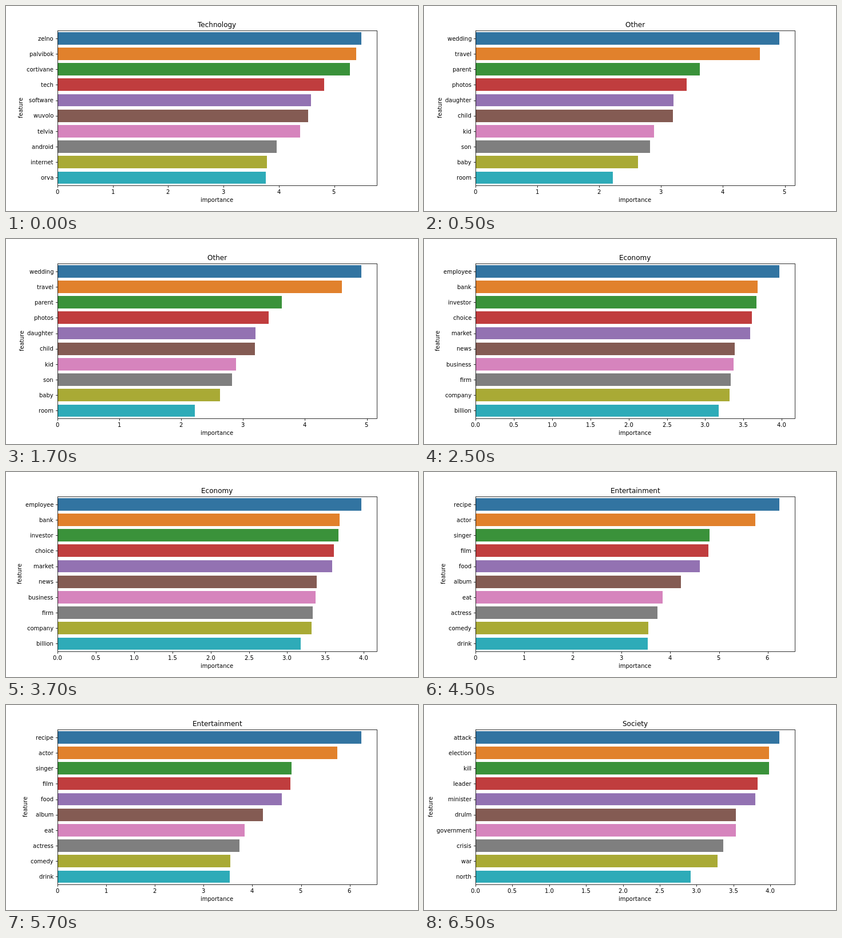
These frames come from a looping animation (720x360 px, 8 s). An HTML page with a canvas:

```html
<!DOCTYPE html>
<html lang="en">
<head>
<meta charset="utf-8">
<title>Feature importance</title>
<style>
html, body { margin: 0; width: 720px; height: 360px; overflow: hidden; background: #fff; }
canvas { display: block; }
</style>
</head>
<body>
<canvas width="720" height="360"></canvas>
<script>
const ctx = document.querySelector('canvas').getContext('2d');
const LEFT = 90, RIGHT = 648, TOP = 43.2, BOTTOM = 315;
const ROW = (BOTTOM - TOP) / 10;
const LOOP = 8000;
const COLORS = ['#3274a1', '#e1812c', '#3a923a', '#c03d3e', '#9372b2',
  '#845b53', '#d684bd', '#7f7f7f', '#a9aa35', '#2eabb8'];

// ends: right edge of each bar; unit: pixels per 1.0; labelX: baseline of the y-axis title
const charts = [
  { start: 0, title: 'Technology', unit: 96.7, step: 1, ticks: 6, labelX: 29,
    words: 'zelno palvibok cortivane tech software wuvolo telvia android internet orva',
    ends: [621, 612, 601, 556, 533, 528, 514, 473, 456, 454] },
  { start: 500, title: 'Other', unit: 108.1, step: 1, ticks: 6, labelX: 31,
    words: 'wedding travel parent photos daughter child kid son baby room',
    ends: [621, 587, 482, 459, 436, 435, 402, 395, 374, 330] },
  { start: 2500, title: 'Economy', unit: 133.8, step: 0.5, ticks: 9, labelX: 27,
    words: 'employee bank investor choice market news business firm company billion',
    ends: [621, 583, 581, 573, 570, 543, 541, 536, 534, 515] },
  { start: 4500, title: 'Entertainment', unit: 85.1, step: 1, ticks: 7, labelX: 37,
    words: 'recipe actor singer film food album eat actress comedy drink',
    ends: [621, 579, 499, 497, 482, 449, 417, 408, 392, 391] },
  { start: 6500, title: 'Society', unit: 128.8, step: 0.5, ticks: 9, labelX: 15,
    words: 'attack election kill leader minister drulm government crisis war north',
    ends: [621, 603, 603, 583, 579, 545, 545, 523, 513, 466] }
];

// align: 0.5 centres the text on x, 1 ends it there
function text(str, x, y, align = 0.5, size = 10) {
  ctx.font = `${size}px "DejaVu Sans", sans-serif`;
  ctx.fillText(str, Math.round(x - ctx.measureText(str).width * align), y);
}

function line(x1, y1, x2, y2) {
  ctx.beginPath();
  ctx.moveTo(x1, y1);
  ctx.lineTo(x2, y2);
  ctx.stroke();
}

function draw(chart) {
  ctx.fillStyle = '#fff';
  ctx.fillRect(0, 0, 720, 360);
  ctx.strokeStyle = '#000';
  ctx.lineWidth = 0.8;

  chart.words.split(' ').forEach((word, i) => {
    const mid = TOP + ROW * (i + 0.5);
    const y1 = Math.round(mid - ROW * 0.4), y2 = Math.round(mid + ROW * 0.4);
    ctx.fillStyle = COLORS[i];
    ctx.fillRect(LEFT, y1, chart.ends[i] - LEFT, y2 - y1);
    ctx.fillStyle = '#000';
    text(word, LEFT - 7, Math.round(mid + 3.8), 1);
    const y = Math.round(mid) + 0.5;
    line(LEFT - 3, y, LEFT + 0.5, y);
  });

  for (let i = 0; i < chart.ticks; i++) {
    const value = i * chart.step, x = LEFT + value * chart.unit;
    const tickX = Math.round(x) + 0.5;
    line(tickX, BOTTOM + 0.5, tickX, BOTTOM + 4);
    text(value.toFixed(chart.step < 1 ? 1 : 0), x, 330);
  }

  ctx.strokeRect(LEFT + 0.5, 43.5, RIGHT - LEFT, 272);
  text(chart.title, (LEFT + RIGHT) / 2, 37, 0.5, 12);
  text('importance', (LEFT + RIGHT) / 2, 344);
  ctx.save();
  ctx.translate(chart.labelX, 179);
  ctx.rotate(-Math.PI / 2);
  text('feature', 0, 0);
  ctx.restore();
}

const origin = performance.now();
function frame() {
  const t = (performance.now() - origin) % LOOP;
  draw(charts.findLast(c => t >= c.start));
  requestAnimationFrame(frame);
}
frame();
</script>
</body>
</html>
```
